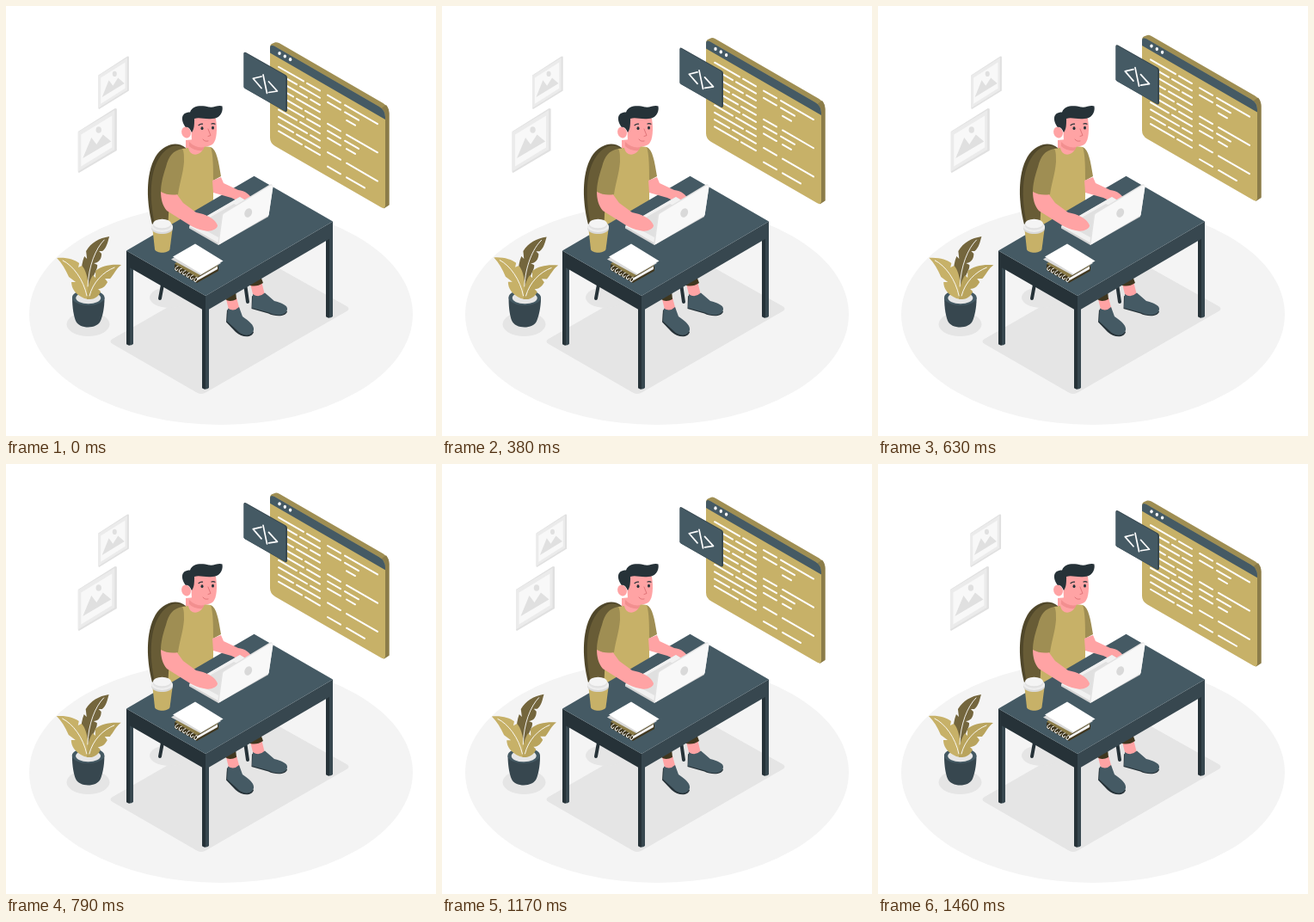
An HTML page that plays this animation: 500 px wide and 500 px high, repeating every 1.5 s.

```html
<!DOCTYPE html>
<html lang="en">
<head>
<meta charset="utf-8">
<title>Programmer at a desk</title>
<style>
  html, body { margin: 0; width: 100%; height: 100%; overflow: hidden; background: #fff; }
  svg { display: block; width: 100%; height: 100%; }
  .line { fill: none; stroke: #fff; stroke-linecap: round; stroke-linejoin: round; }
</style>
</head>
<body>
<svg viewBox="0 0 500 500">
  <!-- floor -->
  <ellipse cx="250" cy="358.500" rx="223" ry="128.500" fill="#f4f4f4"/>
  <g fill="#e5e5e5">
    <path d="M124 387L288 293Q292 290 296 293L396 349Q401 352 396 355L233 449Q227 453 221 449L124 393Q119 390 124 387Z"/>
    <ellipse cx="95.500" cy="370" rx="25" ry="14"/>
    <ellipse cx="190" cy="339" rx="23" ry="12"/>
  </g>

  <g id="pictures">
    <g id="large">
      <path d="M84 146L127 119L129 119.500V168L85 194L84 193Z" fill="#e0e0e0"/>
      <path d="M84 146.500L126.500 121V167L84 192.500Z" fill="#ebebeb"/>
      <path d="M87.500 149.500L123.500 127.500V164.500L87.500 186.500Z" fill="#f8f8f8"/>
      <path d="M89.500 177L99.500 153L105.500 161L113 149.500L122.500 157.500Z" fill="#e0e0e0"/>
      <ellipse cx="108" cy="144" rx="3.200" ry="3.800" fill="#e0e0e0"/>
    </g>
    <use href="#large" transform="translate(41.200 -41.200) scale(.79 .82) translate(0 2.500)"/>
  </g>

  <g id="browser">
    <path d="M307 49Q307 45 309 44L313 42.300Q315 41.800 318 43.300L438.500 113Q445.500 117.500 445.500 125V231L440 235L425 200L320 60Z" fill="#9f8e53"/>
    <path d="M437 118.500L442 115Q445.500 119 445.500 125V231.500L439 235.500Z" fill="#8b7c49"/>
    <path d="M307 49Q307 44 312 46.500L434 117Q441 121 441 129V231Q441 237 436 234L313 163Q307 159.500 307 153Z" fill="#c7b168"/>
    <path d="M307 54.500V49Q307 44 312 46.500L434 117Q441 121 441 129V132Z" fill="#455a64"/>
    <g fill="#fff">
      <ellipse cx="318" cy="55" rx="1.700" ry="2.100"/>
      <ellipse cx="324.300" cy="58.500" rx="1.700" ry="2.100"/>
      <ellipse cx="330.600" cy="62.200" rx="1.700" ry="2.100"/>
    </g>
    <path id="code" class="line" stroke-width="2"/>
    <path d="M276.500 55Q276.500 53 279 54L325 80Q327 81 327 83V121Q327 124 324 122.500L278 96Q276.500 95 276.500 94Z" fill="#37474f"/>
    <path d="M276.500 55.500Q276.500 54 279 55L323 80Q325 81.500 325 83V122.500L278 96Q276.500 95 276.500 94Z" fill="#455a64"/>
    <path class="line" stroke-width="1.700" d="M297 82L287.300 84.300L297 95.500M299 80L303.500 101.500M305.500 88L315.500 99L305.500 100.500"/>
  </g>

  <g id="plant">
    <path d="M77 339C77 352 79 361 81 366C85 376 106 376 110 366C112 361 114.500 352 114.500 339Z" fill="#37474f"/>
    <ellipse cx="95.700" cy="339" rx="18.800" ry="9" fill="#455a64"/>
    <ellipse cx="95.700" cy="339.500" rx="14.500" ry="6.800" fill="#e6e6e6"/>
    <path d="M93 336C87 318 86 303 91 291L94 294L93 285C99 275 108 270 120 268C118 275 117 281 112 285L108 285L111 288C111 295 107 299 102 299L106 301C107 308 98 314 97 337Z" fill="#74663d"/>
    <path d="M91 340C80 335 76 328 76 321L81 321L73 315C69 306 65 299 59 293C70 292 80 295 85 299L84 304L88 302C94 307 97 325 96 341Z" fill="#c7b168"/>
    <path d="M94 341C94 327 97 319 101 313L104 316L104 308C111 302 122 300 134 301C128 305 125 313 121 317L115 317L118 321C115 327 111 329 107 329L110 332C108 338 102 341 98 341Z" fill="#b9a45d"/>
    <path class="line" stroke-width=".9" d="M95 326C96 302 104 282 114 272M94 337C90 318 78 302 66 296M97 337C101 321 113 309 126 304"/>
  </g>

  <!-- chair -->
  <path d="M184 313L179 340M278 323L281 344" fill="none" stroke="#263238" stroke-width="4" stroke-linecap="round"/>
  <path d="M170 254C162 223 163 190 176 172C186 160 199 157 209 165L216 172L204 254Z" fill="#50472a"/>
  <path d="M173 254C166 222 167 192 180 174C189 162 200 159 210 167L204 254Z" fill="#685c36"/>

  <!-- legs and shoes -->
  <g fill="#ffa3a4">
    <path d="M256 341L268 339L272 354L260 357Z"/>
    <path d="M284 323L297 320L301 336L288 339Z"/>
  </g>
  <path d="M252 333L267 331L268 341Q260 345 255 341ZM280 318L296 314L299 322Q292 327 284 325Z" fill="#40371f"/>
  <path d="M286 337L285.500 352L305 357.500C313 361.500 326 361.500 327 355Z" fill="#263238"/>
  <path d="M287 335Q294 340 301 333.500L312 343C320 345 328 348 327 353C325 361 313 360.500 306 356.500L286 351Z" fill="#455a64"/>
  <path d="M257 353L256 367.500L267 379C274 385.500 286 386.500 288 379Z" fill="#263238"/>
  <path d="M258 351.500Q265 356 271 350L275 361C282 366 289 371 288 377C285 385 275 384 269 377.500L257 366.500Z" fill="#455a64"/>

  <!-- torso and head -->
  <path d="M209 156V172L222 180L231 166V154Z" fill="#ffa3a4"/>
  <path d="M213 158Q221 166 231 164L229 168Q219 169 213 163Z" fill="#f28f8f"/>
  <path d="M238 164C245 167 247 180 250 198L239 204L236 185Z" fill="#9f8e53"/>
  <path d="M205 166L212 165C214 176 227 175 231 163L238 164C241 172 241 190 241 204V240L188 262L192 185Z" fill="#c7b168"/>
  <g fill="#ffa3a4">
    <path d="M215 132C223 125 239 126 244 131C246 144 245 155 241 160C236 165 225 165 216 158Z"/>
    <ellipse cx="209.500" cy="147" rx="5.300" ry="6.500" transform="rotate(-18 209.500 147)"/>
  </g>
  <path d="M209 141C203 133 203 123.500 214 123.500C217 115 228 115.500 236 117.500C242 118.500 247 114.500 251.500 116.500C253 125 247 131 240 131C231 132 225 129 219 131C219 138 219 143 216 147C214 143 212 140 209 141Z" fill="#263238"/>
  <g fill="#263238">
    <ellipse cx="228" cy="142.200" rx="1.500" ry="1.900"/>
    <ellipse cx="240.500" cy="141.700" rx="1.500" ry="1.900"/>
  </g>
  <path d="M224 138.700Q226 136.800 228.500 137.200M239 137Q241 136 243 137.200" fill="none" stroke="#263238" stroke-width="1.200" stroke-linecap="round"/>
  <path d="M235 143L238 150.500L235 151.500M229 155Q231 158 235 157" fill="none" stroke="#e07579" stroke-width="1" stroke-linecap="round"/>

  <!-- desk -->
  <g id="deskLegs"></g>
  <path d="M140 284.500L232 337V355L140 302Z" fill="#263238"/>
  <path d="M232 337L380 250.500V268.500L232 355Z" fill="#37474f"/>
  <path d="M140 284.500L288.500 197.700L380 250.500L232 337Z" fill="#455a64"/>

  <!-- laptop and arms -->
  <path d="M240 203L250 199L253 206L270 214C278 215 284 219 286 225L277 230L262 223L241 217Z" fill="#ffa3a4"/>
  <path d="M213 256L272 222L305 243V245L247 278L213 258.500Z" fill="#d5d5d5"/>
  <path d="M213 256L272 222L305 242L247 275.500Z" fill="#f1f1f1"/>
  <path d="M221 255L265 230L290 245L247 269Z" fill="#e0e0e0"/>
  <path d="M180 215L198 218L206 229L221 240C232 242 243 247 246 255C246 260 237 263 230 261C224 260 218 257 214 255L187 238C182 232 180 225 180 215Z" fill="#ffa3a4"/>
  <path d="M205 166C194 168 189 175 186 187C182 199 180 208 180 216Q189 221 200 219C202 205 206 195 207 181C207 173 207 169 205 166Z" fill="#9f8e53"/>
  <path d="M246 277L250.500 243Q251 241 253 240L306 208Q310 206 310.500 210L305.500 243L247.500 277.500Z" fill="#e2e2e2"/>
  <path d="M247.500 277.500L252 244Q252 242 254 241L307 209Q310.500 207 310.500 210L305.500 243.500Z" fill="#f8f8f8"/>
  <ellipse cx="281.700" cy="240.500" rx="4.200" ry="5.400" transform="rotate(25 281.700 240.500)" fill="#d9d9d9"/>

  <!-- cup -->
  <path d="M170.500 260L173 283C175 288 188 288 190.500 283L193.500 260Z" fill="#c7b168"/>
  <path d="M169 256V259C171 267 192 267 194 259V256Z" fill="#d9d9d9"/>
  <ellipse cx="181.500" cy="256.500" rx="12.500" ry="6.500" fill="#ededed"/>
  <path d="M171 253V256C174 262 189 262 192 256V253Z" fill="#e1e1e1"/>
  <ellipse cx="181.500" cy="253" rx="10.500" ry="5.300" fill="#f4f4f4"/>

  <!-- notebook -->
  <path d="M196 301L222 286L247 303V308L222 322L196 307Z" fill="#40371f"/>
  <path d="M222 316.500L246 302.500V306L222 319.500Z" fill="#f5f5f5"/>
  <path d="M196 299.500L222 285L247 301.500L222 315.500Z" fill="#8b7c49"/>
  <path d="M192 294.500L217 280L250 299L226 313Z" fill="#d9d9d9"/>
  <path d="M194 291.500L220 276.500L252.500 296.500L227 311.500Z" fill="#fff"/>
  <path id="spiral" class="line" stroke-width="1"/>
</svg>
<script>
  const byId = id => document.getElementById(id);
  const SLOPE = 0.577, PITCH = 8.3;

  // Rows of code: [row, from, to, from, to, ...]
  const rightRows = [
    [0, 374, 389, 394, 432], [1, 374, 389, 394, 410], [2, 396, 406],
    [4, 374, 389, 396, 432], [5, 374, 389, 394, 410], [6, 374, 389, 396, 406],
    [8, 374, 389, 396, 432], [10, 374, 389, 396, 417]
  ];
  const gaps = [346, 338, 350, 334, 344];
  const leftRows = Array.from({ length: 10 }, (_, i) => {
    const gap = gaps[i % gaps.length];
    return [i, 317, gap, gap + 4, 365];
  });
  let code = '';
  for (const [row, ...xs] of [...leftRows, ...rightRows])
    xs.forEach((x, i) => code += `${i % 2 ? 'L' : 'M'}${x} ${65 + row * PITCH + (x - 307) * SLOPE}`);
  byId('code').setAttribute('d', code);

  let spiral = '';
  for (let i = 0; i < 6; i++) spiral += `M${200 + i * 4.4} ${302.5 + i * 2.6}q-4 1 -3 4.5q2 2 3 -1`;
  byId('spiral').setAttribute('d', spiral);

  const leg = (x, top, bottom) =>
    `<path d="M${x} ${top}h8v${bottom - top}q-4 3 -8 0z" fill="#37474f"/>` +
    `<path d="M${x} ${top}h4v${bottom - top + 1.5}q-2 0 -4 -1.5z" fill="#263238"/>`;
  byId('deskLegs').innerHTML = leg(140, 296, 393) + leg(372, 262, 361) + leg(228, 348, 444);

  // Evenly spaced keyframes with linear steps between them
  const PERIOD = 1500, LEAD = 30;
  const floating = [0.4, -9.6, 0.4];
  const sway = [0, 1, 0, -1, 0];
  const shake = [0, -1, 2, -4, 4, -4, 4, -4, 2, -1, 0];
  function sample(keys, phase) {
    const p = phase * (keys.length - 1), i = Math.floor(p);
    return keys[i] + (keys[i + 1] - keys[i]) * (p - i);
  }

  const start = performance.now();
  function draw(now) {
    const phase = (Math.max(0, now - start) + LEAD) % PERIOD / PERIOD;
    byId('browser').setAttribute('transform', `translate(0 ${sample(floating, phase)})`);
    byId('pictures').setAttribute('transform', `translate(${sample(shake, phase)} 0)`);
    byId('plant').setAttribute('transform', `rotate(${sample(sway, phase)} 95 375)`);
    requestAnimationFrame(draw);
  }
  draw(start);
</script>
</body>
</html>
```
